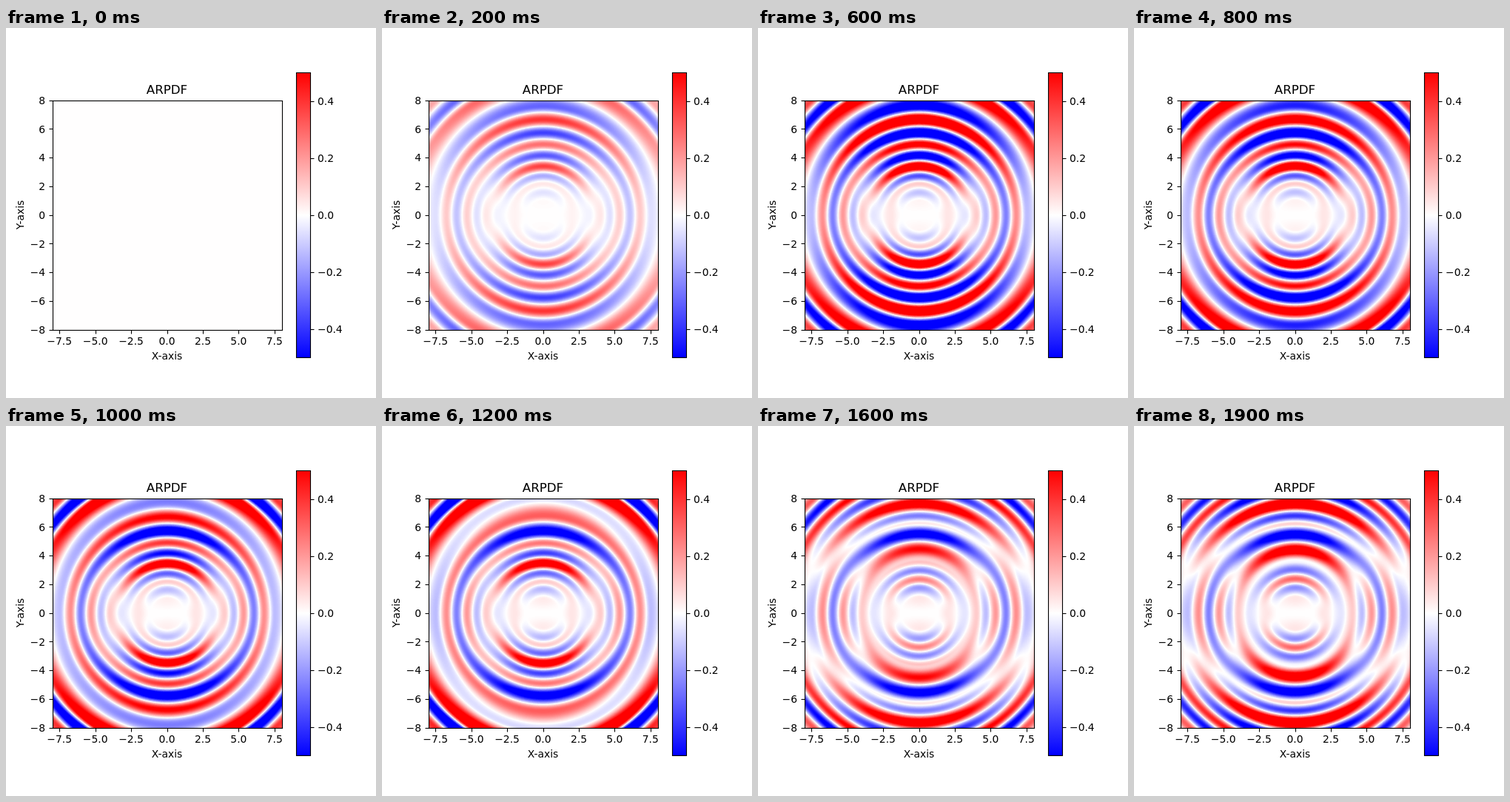
An HTML page with a canvas for the animation above (2000 ms loop, 500 by 500 pixels).

```html
<!DOCTYPE html>
<html lang="en">
<head>
<meta charset="utf-8">
<title>ARPDF</title>
<style>
  html, body { margin: 0; width: 100%; height: 100%; overflow: hidden; background: #fff; }
  canvas { position: absolute; left: 63px; top: 98px; }
  svg { position: absolute; left: 0; top: 0; }
  text { font: 13.89px "DejaVu Sans", sans-serif; }
  .title { font-size: 16.67px; }
  .mid { text-anchor: middle; }
  .end { text-anchor: end; }
  .line { fill: none; stroke: #000; stroke-width: 1.11; }
</style>
</head>
<body>
<canvas id="field" width="310" height="310"></canvas>
<svg id="chart" width="500" height="500" viewBox="0 0 500 500">
  <defs>
    <linearGradient id="scale" x2="0" y2="1">
      <stop stop-color="#f00"/>
      <stop offset=".5" stop-color="#fff"/>
      <stop offset="1" stop-color="#00f"/>
    </linearGradient>
  </defs>
  <rect x="392.5" y="60.5" width="19" height="385" fill="url(#scale)"/>
  <rect class="line" x="392.5" y="60.5" width="19" height="385"/>
  <rect class="line" x="63.5" y="98.5" width="310" height="310"/>
  <text class="title mid" x="217.5" y="89.3">ARPDF</text>
  <text class="mid" x="217.5" y="448">X-axis</text>
  <text class="mid" transform="translate(23.5 252.5) rotate(-90)">Y-axis</text>
</svg>
<script>
const SIZE = 310, UNIT = SIZE / 16, STEP_MS = 100, LOOP_MS = 2000;

// Ring crests and troughs as [radius, value], along the vertical axis at three stages
const early = [[0, 0], [1, .02], [1.6, -.12], [2.2, .1], [2.75, -.35], [3.42, .8], [4.17, -.7],
  [4.95, .6], [5.75, -.8], [6.68, .85], [7.6, -.65], [9.2, .75], [10.05, -.85], [11, .5]];
const middle = [[0, 0], [1, .04], [1.7, -.14], [2.22, .1], [2.82, -.3], [3.5, .7], [4.2, -.38],
  [4.9, .27], [5.72, -.62], [6.8, .32], [8.1, -.08], [9.3, .9], [10.05, -1.1], [10.95, .6]];
const late = [[0, 0], [1.1, .05], [1.8, -.22], [2.4, .3], [3.05, -.27], [3.65, -.01], [4.42, .68],
  [5.5, -.65], [6.25, .09], [6.8, -.4], [7.65, .85], [8.6, -.7], [9.35, .55], [10.1, -.6], [10.8, .4], [11.4, -.05]];
// The same along the horizontal axis
const side = [[0, 0], [1.2, 0], [2, .05], [3.2, -.05], [4, .1], [4.65, -.13], [5.33, .2],
  [6.05, -.25], [6.75, .22], [7.5, -.13], [9.2, .3], [10.05, -.3], [10.95, .25], [11.4, .1]];

const growth = [[0, 0], [200, .47], [600, 1]];
const stage = [[600, 0], [1000, .6], [1200, 1], [1600, 1.8], [1900, 2]];

const linear = k => k;
const wave = k => (1 - Math.cos(Math.PI * k)) / 2;

function sample(points, x, ease) {
  if (x <= points[0][0]) return points[0][1];
  const i = points.findIndex(p => p[0] >= x);
  if (i < 0) return points[points.length - 1][1];
  const [x0, y0] = points[i - 1], [x1, y1] = points[i];
  return y0 + (y1 - y0) * ease((x - x0) / (x1 - x0));
}

const FINE = 100;
const profile = points => Float32Array.from({ length: 12 * FINE }, (_, i) => sample(points, i / FINE, wave));
const vertical = [early, middle, late].map(profile);
const horizontal = profile(side);

const ctx = document.getElementById("field").getContext("2d");
const image = ctx.createImageData(SIZE, SIZE);

function paintField(time) {
  const grow = sample(growth, time, linear);
  const phase = sample(stage, time, linear);
  const from = Math.min(1, Math.floor(phase)), mix = phase - from;
  const upright = vertical[from].map((v, i) => v + (vertical[from + 1][i] - v) * mix);
  const data = image.data;
  let at = 0;
  for (let row = 0; row < SIZE; row++) {
    const y = (row + .5 - SIZE / 2) / UNIT;
    for (let col = 0; col < SIZE; col++) {
      const x = (col + .5 - SIZE / 2) / UNIT;
      const rr = x * x + y * y;
      const i = Math.round(Math.sqrt(rr) * FINE);
      const value = grow * (horizontal[i] + (upright[i] - horizontal[i]) * y * y / rr);
      const level = Math.max(0, Math.min(255, Math.floor((value + .5) * 256)));
      data[at++] = Math.min(255, level * 2);
      data[at++] = Math.min(level, 255 - level) * 2;
      data[at++] = Math.min(255, (255 - level) * 2);
      data[at++] = 255;
    }
  }
  ctx.putImageData(image, 0, 0);
}

const chart = document.getElementById("chart");
const snap = v => Math.floor(v + .5) + .5;

function add(tag, attrs, content = "") {
  const el = document.createElementNS(chart.namespaceURI, tag);
  for (const name in attrs) el.setAttribute(name, attrs[name]);
  el.textContent = content;
  chart.append(el);
}

const tick = d => add("path", { class: "line", d });
const label = (value, digits) => value.toFixed(digits).replace("-", "\u2212");

for (let v = -7.5; v <= 7.5; v += 2.5) {
  const x = 217.5 + v * UNIT;
  tick(`M${snap(x)} 408.5v5`);
  add("text", { class: "mid", x, y: 428 }, label(v, 1));
}
for (let v = -8; v <= 8; v += 2) {
  const y = 252.5 - v * UNIT;
  tick(`M63.5 ${snap(y)}h-5`);
  add("text", { class: "end", x: 53, y: y + 5.3 }, label(v, 0));
}
for (let n = -2; n <= 2; n++) {
  const y = 252.5 - n * 77;
  tick(`M411.5 ${snap(y)}h5`);
  add("text", { x: 421, y: y + 5.3 }, label(n / 5, 1));
}

let shown = -1;
function play() {
  const step = Math.floor(performance.now() % LOOP_MS / STEP_MS);
  if (step !== shown) paintField((shown = step) * STEP_MS);
  requestAnimationFrame(play);
}
play();
</script>
</body>
</html>
```
